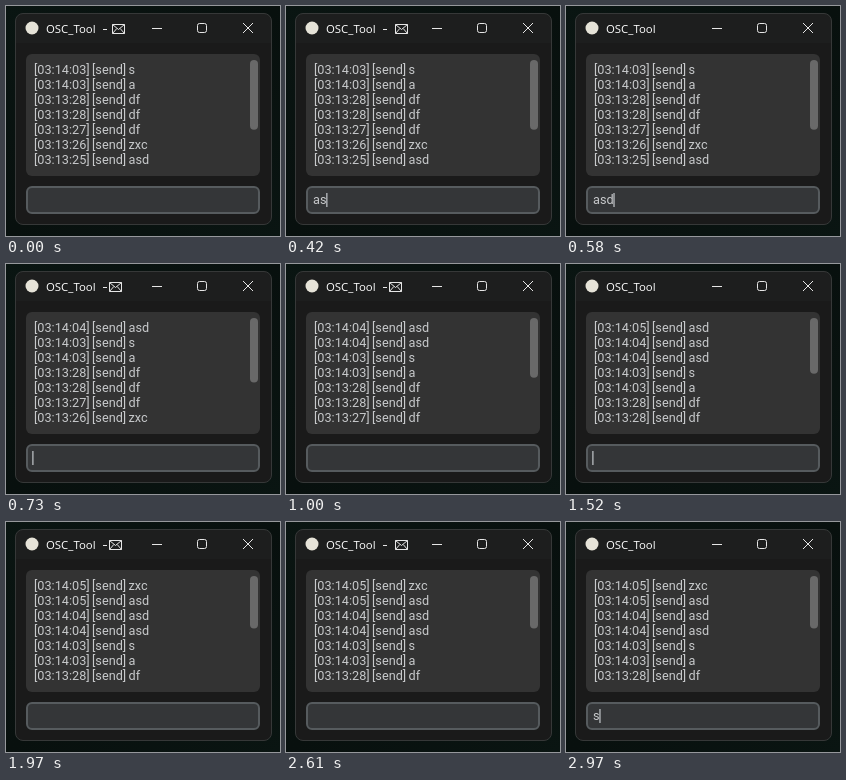
Recreate the animation shown at these times as an HTML page. Size 274 px wide and 230 px high, loop 3 s.

```html
<!DOCTYPE html>
<html lang="en">
<head>
<meta charset="utf-8">
<title>OSC_Tool</title>
<style>
  html, body { margin: 0; width: 100%; height: 100%; overflow: hidden; background: #07100e; }
  svg { display: block; width: 274px; height: 230px; }
  .title { font: 11.4px "Open Sans", "Noto Sans", sans-serif; fill: #fff; }
  .mono { font: 12.7px Roboto, sans-serif; word-spacing: -.8px; fill: #c8cacc; }
  .line { fill: none; stroke: #e6e6e6; }
</style>
</head>
<body>
<svg viewBox="0 0 274 230">
  <defs>
    <linearGradient id="back" x2="1" y2="1">
      <stop offset="0" stop-color="#0a1512"/>
      <stop offset=".5" stop-color="#08100e"/>
      <stop offset="1" stop-color="#0a1512"/>
    </linearGradient>
    <clipPath id="win"><rect x="9.5" y="7.5" width="256" height="211" rx="7.5"/></clipPath>
  </defs>
  <rect width="274" height="230" fill="url(#back)"/>

  <g clip-path="url(#win)">
    <rect x="9" y="7" width="257" height="212" fill="#1a1a1a"/>
    <rect x="9" y="7" width="257" height="30" fill="#1d1e1e"/>
  </g>
  <rect x="9.5" y="7.5" width="256" height="211" rx="7.5" fill="none" stroke="#363838"/>

  <circle cx="26" cy="22" r="6.5" fill="#e6e3d8"/>
  <text class="title" x="40" y="27">OSC_Tool</text>
  <g id="badge">
    <path class="line" d="M97 23.5h4"/>
    <path id="mail" class="line" d="M.5 .5h12v9h-12zl6 5 6-5M.5 9.5l4.3-5M12.5 9.5l-4.3-5"/>
  </g>
  <path class="line" d="M146 22.5h10M237 17l10 10M247 17l-10 10"/>
  <rect class="line" x="191.5" y="17.5" width="9" height="9" rx="2"/>

  <rect x="20" y="48" width="234" height="122" rx="6" fill="#333"/>
  <g id="log"></g>
  <rect id="thumb" x="244" y="54" width="8" rx="4" fill="#696969"/>

  <rect x="21" y="181" width="232" height="26" rx="5" fill="#343638" stroke="#565b5e" stroke-width="2"/>
  <text id="entry" class="mono" x="27" y="198"></text>
  <rect id="caret" y="187" width="1.2" height="14" fill="#c4c8cc"/>
</svg>
<script>
const LOOP = 3000;
const ROWS = 7;
const STEP = 305;
const byId = id => document.getElementById(id);

const history = ['03:14:03 s', '03:14:03 a', '03:13:28 df', '03:13:28 df',
                 '03:13:27 df', '03:13:26 zxc', '03:13:25 asd'];
// [key times, send time, text, clock]
const sends = [
  [[], -395, '', ''],
  [[300, 390, 480], 600, 'asd', '03:14:04'],
  [[780, 840, 900], 990, 'asd', '03:14:04'],
  [[1060, 1120, 1180], 1265, 'asd', '03:14:05'],
  [[1650, 1740, 1830], 1965, 'zxc', '03:14:05'],
  [[2960], Infinity, 's', '']
];

// Every send starts its own chain of title updates; the latest update wins.
const badges = sends.filter(s => s[1] < LOOP)
  .flatMap(s => [0, 1, 2, 3].map(i => [s[1] + i * STEP, i]))
  .sort((a, b) => a[0] - b[0]);

const rows = Array.from({ length: ROWS }, (_, i) => {
  const row = document.createElementNS('http://www.w3.org/2000/svg', 'text');
  row.setAttribute('class', 'mono');
  row.setAttribute('x', 28);
  row.setAttribute('y', 68 + 15 * i);
  return byId('log').appendChild(row);
});

function draw(t) {
  const sent = sends.filter(s => s[2] && s[1] <= t);
  const lines = [...sent.map(s => s[3] + ' ' + s[2]).reverse(), ...history];
  rows.forEach((row, i) => {
    const [clock, text] = lines[i].split(' ');
    row.textContent = `[${clock}] [send] ${text}`;
  });
  byId('thumb').setAttribute('height', 838 / (12 + sent.length));

  const step = badges.filter(b => b[0] <= t).pop()[1];
  byId('badge').style.display = step < 3 ? '' : 'none';
  byId('mail').setAttribute('transform', `translate(${103 + 3 * step} 18)`);

  const [keys, , text] = sends.find(s => s[1] > t);
  const typed = text.slice(0, keys.filter(k => k <= t).length);
  const entry = byId('entry');
  entry.textContent = typed;
  const caret = byId('caret');
  caret.setAttribute('x', typed ? 26.8 + entry.getComputedTextLength() : 26.3);
  // Caret blinks 600 ms on, 300 ms off.
  caret.style.display = (t + 690) % 900 < 600 ? '' : 'none';
}

const start = performance.now();
function tick() {
  draw((performance.now() - start) % LOOP);
  requestAnimationFrame(tick);
}
tick();
</script>
</body>
</html>
```
